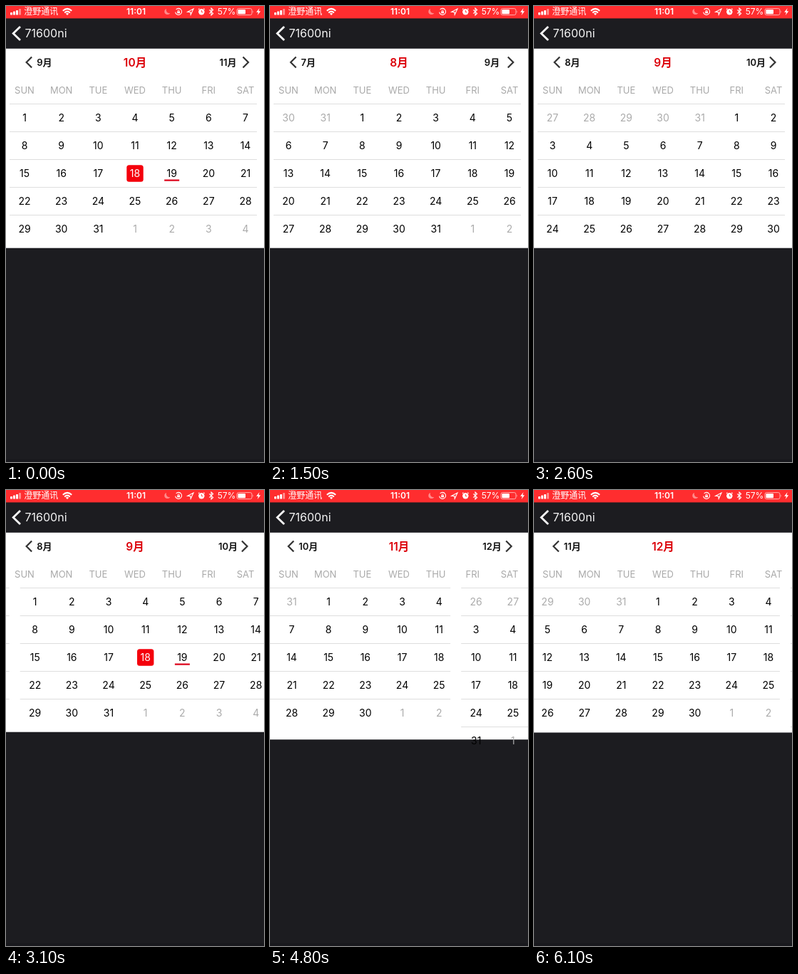
These frames come from a looping animation (362x640 px, 6200 ms). An HTML page:

```html
<!DOCTYPE html>
<html lang="zh-CN">
<head>
<meta charset="utf-8">
<title>Calendar</title>
<style>
  html, body { margin: 0; width: 100%; height: 100%; overflow: hidden; background: #1c1c20; }
  svg { display: block; width: 100%; height: 100%; }
  text { font-family: Inter, "Noto Sans CJK SC", "Noto Sans CJK", sans-serif; }
  .mid, .day, .week, .side, #title { text-anchor: middle; }
  .day { font-size: 14px; fill: #000; }
  .out { fill: #ababab; }
  .picked { fill: #fff; }
  .week { font-size: 13px; fill: #a9a9a9; }
  .side { font-size: 13px; font-weight: 600; fill: #111; }
  #title { font-size: 15.5px; font-weight: 600; fill: #dc0009; }
  .rule { stroke: #dedede; stroke-width: 1; }
  .chev { fill: none; stroke: #333; stroke-width: 2.2; }
  .bar { font-size: 12px; fill: #fff; }
  .thin { fill: none; stroke: #fff; stroke-width: 1.1; }
</style>
</head>
<body>
<svg viewBox="0 0 362 640">
  <rect width="362" height="640" fill="#1c1c20"/>
  <rect y="636" width="362" height="4" fill="#18181d"/>

  <!-- calendar -->
  <rect id="panel" y="59.8" width="362" fill="#fff"/>
  <g id="strip"></g>
  <g id="weeks"></g>
  <path id="prevArrow" class="chev" d="M9 -7.5L1.5 0L9 7.5"/>
  <text id="prev" class="side" x="53.8" y="83.7"></text>
  <text id="title" x="181" y="84.6"></text>
  <g id="nextGroup">
    <text id="next" class="side" x="311.5" y="83.7"></text>
    <path id="nextArrow" class="chev" d="M1 -7.5L8.5 0L1 7.5"/>
  </g>

  <!-- navigation bar -->
  <path d="M20 29L10.2 38.5L20 48" fill="none" stroke="#fff" stroke-width="2.8"/>
  <text x="26.5" y="44.3" font-size="16" fill="#f4f4f4">71600ni</text>

  <!-- status bar -->
  <rect width="362" height="17.4" fill="#ff2d2f"/>
  <g fill="#fff">
    <rect x="6" y="9" width="3" height="3.5" rx=".6"/>
    <rect x="10" y="7.5" width="3" height="5" rx=".6"/>
    <rect x="14" y="6" width="3" height="6.5" rx=".6"/>
    <rect x="18" y="4" width="3" height="8.5" rx=".6" opacity=".45"/>
  </g>
  <text class="bar" x="25.3" y="12.4" font-weight="300">澄野通讯</text>
  <g class="thin" style="stroke-width:2">
    <path d="M79.8 6.8Q86 1 92.2 6.8"/>
    <path d="M82.2 9.4Q86 5.8 89.8 9.4"/>
  </g>
  <path d="M83.9 10.7Q86 8.9 88.1 10.7L86 13Z" fill="#fff"/>
  <text class="bar mid" x="182.5" y="12.3" font-weight="600">11:01</text>
  <path d="M225 3.8A4.3 4.3 0 1 0 230.3 9.9A4.5 4.5 0 0 1 225 3.8Z" fill="#ff8b8b"/>
  <g class="thin">
    <path d="M238.6 5A4.5 4.5 0 1 1 237.6 8.6"/>
    <path d="M241 7.6V6.9A1.1 1.1 0 0 1 243.2 6.9V7.6" stroke-width=".8"/>
    <path d="M254.8 8.3L263 4L259.2 12.3L258.8 8.6Z"/>
    <path d="M285.2 5.3L290.6 10.4L288 12.9V3L290.6 5.5L285.2 10.6"/>
    <path d="M270 4.8L271.5 3.6M277.1 3.6L278.6 4.8"/>
  </g>
  <rect x="240.2" y="7.5" width="3.8" height="2.8" fill="#fff"/>
  <circle cx="274.3" cy="8.3" r="4.2" fill="#fff"/>
  <path d="M274.3 5.8V8.5H276.4" fill="none" stroke="#ff2d2f" stroke-width=".9"/>
  <text class="bar mid" x="309.5" y="12.3">57%</text>
  <rect x="324" y="3.6" width="21" height="9" rx="2.3" fill="none" stroke="#ffb0b0"/>
  <rect x="325.4" y="5" width="10.6" height="6.2" rx="1" fill="#fff"/>
  <path d="M346.3 6.5Q348 8.1 346.3 9.7Z" fill="#ffb0b0"/>
  <path d="M355.6 3L351.2 8.8H354L352.8 13L357.2 7.2H354.4Z" fill="#fff"/>
</svg>

<script>
const W = 362, ROW = 39, LOOP = 6200, STEP = 100;
const YEAR = 2017, FIRST = 8, LAST = 12;
const $ = id => document.getElementById(id);
const colX = c => 26 + c * 310 / 6;

function add(parent, tag, attrs, text) {
  const el = document.createElementNS('http://www.w3.org/2000/svg', tag);
  for (const k in attrs) el.setAttribute(k, attrs[k]);
  if (text !== undefined) el.textContent = text;
  return parent.appendChild(el);
}

function buildPage(month) {
  const page = add($('strip'), 'g', { transform: `translate(${(month - FIRST) * W})` });
  const lead = new Date(YEAR, month - 1, 1).getDay();
  const days = new Date(YEAR, month, 0).getDate();
  const rows = Math.ceil((lead + days) / 7);
  for (let r = 0; r < rows; r++) {
    const y = 137 + r * ROW;
    add(page, 'line', { class: 'rule', x1: 5, x2: 352, y1: y + .5, y2: y + .5 });
    for (let c = 0; c < 7; c++) {
      const n = r * 7 + c - lead + 1;
      const inside = n >= 1 && n <= days;
      const x = colX(c);
      let cls = inside ? 'day' : 'day out';
      if (month === 10 && n === 18) {
        cls += ' picked';
        add(page, 'rect', { x: x - 11.7, y: y + 8.3, width: 23.4, height: 23.4, rx: 3.5, fill: '#f4000c' });
      }
      if (month === 10 && n === 19)
        add(page, 'rect', { x: x - 10.5, y: y + 28.5, width: 21, height: 2.2, fill: '#dc0018' });
      add(page, 'text', { class: cls, x, y: y + 25 }, new Date(YEAR, month - 1, n).getDate());
    }
  }
}

for (let m = FIRST; m <= LAST; m++) buildPage(m);
'SUN MON TUE WED THU FRI SAT'.split(' ').forEach((d, c) =>
  add($('weeks'), 'text', { class: 'week', x: colX(c), y: 122.7 }, d));

// start time, target month, steps until settled, share dragged in the first step
const swipes = [
  [300, 9, 4, .25],
  [1100, 8, 4, .25],
  [2100, 9, 5, .15],
  [2800, 10, 4, .26],
  [4000, 11, 5, .279],
  [4800, 12, 4, .273],
  [5700, 11, 5, .069]
];

// the page follows the finger, then the remaining way decays to zero
function stateAt(t) {
  let month = 10, pos = 10;
  for (const [start, to, steps, drag] of swipes) {
    const k = Math.floor((t - start) / STEP);
    if (k < 0) break;
    if (k >= steps) { month = pos = to; continue; }
    pos = to + (month - to) * (1 - drag) * Math.pow(.38, k);
  }
  return { month, pos };
}

// a wider label pushes its arrow to the left
function setSide(name, m, right) {
  const label = $(name);
  label.textContent = m + '月';
  const x = right - label.getComputedTextLength() / 2;
  $(name + 'Arrow').setAttribute('transform', `translate(${x} 79)`);
}

let shown = 0;
function showHeader(m) {
  if (m === shown) return;
  shown = m;
  $('title').textContent = m + '月';
  $('nextGroup').style.display = m === LAST ? 'none' : '';
  setSide('prev', m - 1, 37.8);
  setSide('next', m + 1, 343.5);
}

function draw(t) {
  const { month, pos } = stateAt(t);
  $('strip').setAttribute('transform', `translate(${(FIRST - pos) * W})`);
  $('panel').setAttribute('height', 279.9 + 38.6 * Math.max(0, pos - 11));
  showHeader(month);
}

const begin = performance.now();
function tick() {
  draw((performance.now() - begin) % LOOP);
  requestAnimationFrame(tick);
}
tick();
</script>
</body>
</html>
```
